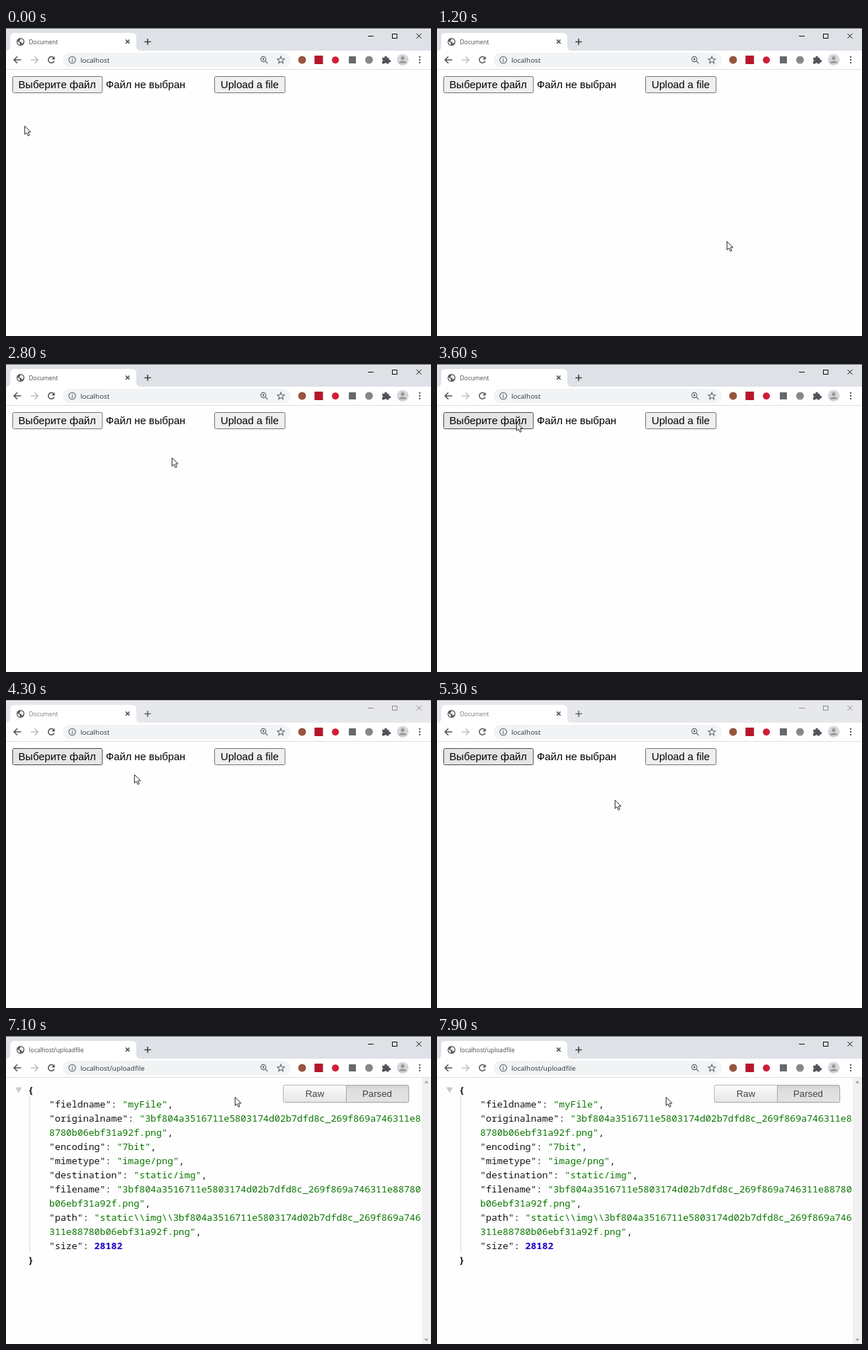
An HTML page that plays this animation: 600 px wide and 435 px high, repeating every 8000 ms.

```html
<!DOCTYPE html>
<html lang="ru">
<head>
<meta charset="utf-8">
<title>Document</title>
<style>
  html, body { margin: 0; width: 100%; height: 100%; overflow: hidden; background: #fefefe; }
  .stage { position: relative; width: 600px; height: 435px; overflow: hidden; animation: focus 8s step-end infinite; }
  svg { position: absolute; left: 0; top: 0; display: block; }

  .ui { font-family: "Open Sans", "Noto Sans", sans-serif; }
  .tab-title { font-size: 8.4px; fill: var(--title); }
  .url { font-size: 9.85px; fill: #303236; }
  .form { font: 14.75px "Liberation Sans", Arial, sans-serif; }
  .bar { fill: var(--bar); }
  .edge { fill: var(--edge); }
  .win { stroke: var(--win); fill: none; }
  .line { fill: none; stroke: #4f5358; stroke-width: 1.5; }
  .thin { fill: none; stroke: #5f6368; stroke-width: 1.1; }
  .btn { fill: #efefef; stroke: #767676; }

  .form, .first { animation: leave 8s step-end infinite; }
  .second, .result { animation: enter 8s step-end infinite; }
  .no-file { animation: unpick 8s step-end infinite; }
  .file { animation: pick 8s step-end infinite; }
  .choose { animation: choose 8s step-end infinite; }
  .send { animation: send 8s step-end infinite; }
  .pointer { animation: move 8s infinite; }

  pre {
    position: absolute; left: 31px; top: 66px; margin: 0;
    font: 13.25px/20px "Noto Sans Mono", "DejaVu Sans Mono", monospace; color: #111;
  }
  pre div { margin-left: 30px; }
  pre i { font-style: normal; color: #0b7500; }
  pre b.num { color: #1a01cc; }

  /* window loses focus while the file dialog is open */
  @keyframes focus {
    0%, 72.5%, 100% { --bar: #dee1e6; --edge: #6a6d72; --title: #45494d; --win: #111; --plus: #3c4043; }
    48.75% { --bar: #e7e8ec; --edge: #b4b6ba; --title: #777a7e; --win: #8c8e91; --plus: #606367; }
  }
  @keyframes leave { 0% { opacity: 1 } 86.25%, 100% { opacity: 0 } }
  @keyframes enter { 0% { opacity: 0 } 86.25%, 100% { opacity: 1 } }
  @keyframes unpick { 0% { opacity: 1 } 72.5%, 100% { opacity: 0 } }
  @keyframes pick { 0% { opacity: 0 } 72.5%, 100% { opacity: 1 } }
  @keyframes choose {
    0%, 81.25%, 100% { fill: #efefef; stroke: #767676 }
    38.75% { fill: #e5e5e5; stroke: #4c4c4c }
  }
  @keyframes send {
    0%, 100% { fill: #efefef; stroke: #767676 }
    83.75% { fill: #e5e5e5; stroke: #4c4c4c }
  }
  @keyframes move {
    0% { transform: translate(26px, 138px); animation-timing-function: steps(1) }
    1.25% { transform: translate(26px, 138px); animation-timing-function: steps(4) }
    6.25% { transform: translate(190px, 215px); animation-timing-function: steps(4) }
    11.25% { transform: translate(396px, 301px); animation-timing-function: steps(1) }
    12.5%, 23.75% { transform: translate(409px, 301px); animation-timing-function: steps(4) }
    28.75% { transform: translate(345px, 260px); animation-timing-function: steps(4) }
    33.75% { transform: translate(250px, 156px); animation-timing-function: steps(1) }
    35% { transform: translate(234px, 132px); animation-timing-function: steps(3) }
    38.75%, 47.5% { transform: translate(112px, 82px); animation-timing-function: steps(4) }
    52.5%, 53.75% { transform: translate(181px, 105px); animation-timing-function: steps(2) }
    56.25% { transform: translate(202px, 123px); animation-timing-function: steps(2) }
    58.75% { transform: translate(246px, 148px); animation-timing-function: steps(3) }
    62.5%, 78.75% { transform: translate(251px, 141px); animation-timing-function: steps(4) }
    83.75%, 100% { transform: translate(323px, 86px); animation-timing-function: steps(1) }
  }
</style>
</head>
<body>
<div class="stage">
  <svg width="600" height="435" viewBox="0 0 600 435">
    <defs>
      <linearGradient id="raised" x2="0" y2="1">
        <stop stop-color="#fbfbfb"/><stop offset="1" stop-color="#e6e6e6"/>
      </linearGradient>
      <linearGradient id="pressed" x2="0" y2="1">
        <stop stop-color="#cfcfcf"/><stop offset=".25" stop-color="#dedede"/><stop offset="1" stop-color="#e3e3e3"/>
      </linearGradient>
    </defs>

    <!-- title bar and tab -->
    <rect class="bar" width="600" height="32"/>
    <rect class="edge" width="600" height="1"/>
    <path fill="#fff" d="M0 32Q6 32 6 26V13Q6 7 12 7H178Q184 7 184 13V26Q184 32 190 32Z"/>
    <rect y="32" width="600" height="26" fill="#fff"/>
    <path d="M0 58.5H600" stroke="#dcdee1"/>
    <circle cx="20.5" cy="19.5" r="5.5" fill="#565a5f"/>
    <path fill="#fff" d="M16.3 18.6L19.5 21V23.9Q16 22.8 16.3 18.6ZM20 15.3Q24.5 15.5 24.8 19.8L22.6 22.4 21.8 19.8 18.9 19.2 19 17.6 20.8 17Z"/>
    <g class="ui tab-title">
      <text class="first" x="32.5" y="22.5">Document</text>
      <text class="second" x="32.5" y="22.5">localhost/uploadfile</text>
    </g>
    <path class="line" d="M169 16.5l5.4 5.4m0-5.4l-5.4 5.4"/>
    <path d="M195.5 19.5h9m-4.5-4.5v9" fill="none" style="stroke:var(--plus)" stroke-width="1.5"/>
    <g class="win">
      <path d="M511 11.5h8"/>
      <rect x="545.5" y="8.5" width="6.5" height="6"/>
      <path d="M579.5 7.8l7 7m0-7l-7 7"/>
    </g>

    <!-- toolbar -->
    <path class="line" d="M21.5 45H11.5M16 40.3L11.3 45 16 49.7"/>
    <path class="line" style="stroke:#bdc0c3" d="M35 45H45M40.5 40.3L45.2 45 40.5 49.7"/>
    <path class="line" d="M67.4 42.2A4.3 4.3 0 1 0 68 46.6"/>
    <path fill="#4f5358" d="M68.8 40V44.4H64.4Z"/>
    <rect x="80" y="35" width="322" height="20" rx="10" fill="#f1f3f4"/>
    <circle class="thin" cx="93.5" cy="45" r="4.8"/>
    <path class="thin" d="M93.5 44.3v3.4M93.5 42v1.2"/>
    <g class="ui url">
      <text class="first" x="105" y="48.6">localhost</text>
      <text class="second" x="105" y="48.6">localhost/uploadfile</text>
    </g>
    <circle class="thin" cx="363.3" cy="44" r="3.6"/>
    <path class="thin" d="M366 46.7l3.4 3.4M361.6 44h3.4m-1.7-1.7v3.4"/>
    <path class="thin" d="M388 40.2l1.4 3.3 3.6.3-2.7 2.4.8 3.5-3.1-1.9-3.1 1.9.8-3.5-2.7-2.4 3.6-.3Z"/>

    <circle cx="418" cy="45" r="5.5" fill="#96553f"/>
    <rect x="435.5" y="39" width="12" height="12" fill="#b5162c"/>
    <circle cx="465" cy="45.3" r="5" fill="#cf1f35"/>
    <rect x="484" y="40" width="10" height="10" fill="#66696c"/>
    <circle cx="512.5" cy="45" r="5.5" fill="#85888b"/>

    <path fill="#505459" d="M531 42h3.4a1.8 1.8 0 1 1 3.4 0h2.7v3a1.9 1.9 0 1 1 0 3.4v2.1h-3a1.8 1.8 0 0 0-3.4 0H531v-3a1.8 1.8 0 0 0 0-3.4Z"/>
    <circle cx="560" cy="45" r="8.3" fill="#d5d6d9"/>
    <circle cx="560" cy="42.6" r="2.6" fill="#97999d"/>
    <path fill="#97999d" d="M554.8 49.8Q555 46.6 560 46.6T565.2 49.8Z"/>
    <g fill="#4f5358">
      <circle cx="584" cy="41" r="1.15"/><circle cx="584" cy="45" r="1.15"/><circle cx="584" cy="49" r="1.15"/>
    </g>

    <!-- upload form -->
    <g class="form">
      <rect class="btn choose" x="9.5" y="68.5" width="126.5" height="23" rx="2"/>
      <rect class="btn send" x="294.5" y="68.5" width="99.5" height="23" rx="2"/>
      <text x="17.5" y="85">Выберите файл</text>
      <text class="no-file" x="141" y="85">Файл не выбран</text>
      <text class="file" x="141" y="85">3bf804a3…1a92f.png</text>
      <text x="303" y="85">Upload a file</text>
    </g>

    <!-- result page -->
    <g class="result">
      <path d="M13 72.5h9.5l-4.75 8Z" fill="#c9c9c9"/>
      <path d="M33.5 86V306" stroke="#bbb" stroke-dasharray="1 1"/>
      <rect x="391.5" y="70.5" width="177.5" height="24" rx="2" fill="none" stroke="#000" stroke-opacity=".1"/>
      <path d="M393.5 69.5H480.5V93.5H393.5a2 2 0 0 1-2-2V71.5a2 2 0 0 1 2-2Z" fill="url(#raised)" stroke="#b6b6b6"/>
      <path d="M480.5 69.5H566.5a2 2 0 0 1 2 2V91.5a2 2 0 0 1-2 2H480.5Z" fill="url(#pressed)" stroke="#a9a9a9"/>
      <g font-family="Liberation Sans, Arial, sans-serif" font-size="13.25" fill="#444" text-anchor="middle">
        <text x="436" y="86">Raw</text>
        <text x="524" y="86">Parsed</text>
      </g>
      <rect x="587" y="59" width="13" height="376" fill="#f1f1f1"/>
      <path d="M590.5 66.5h6l-3-3.4ZM590.5 427.5h6l-3 3.4Z" fill="#a3a3a3"/>
    </g>
  </svg>

  <pre class="result"><b>{</b><div>"fieldname": <i>"myFile"</i>,
"originalname": <i>"3bf804a3516711e5803174d02b7dfd8c_269f869a746311e8
8780b06ebf31a92f.png"</i>,
"encoding": <i>"7bit"</i>,
"mimetype": <i>"image/png"</i>,
"destination": <i>"static/img"</i>,
"filename": <i>"3bf804a3516711e5803174d02b7dfd8c_269f869a746311e88780
b06ebf31a92f.png"</i>,
"path": <i>"static\\img\\3bf804a3516711e5803174d02b7dfd8c_269f869a746
311e88780b06ebf31a92f.png"</i>,
"size": <b class="num">28182</b></div><b>}</b></pre>

  <svg width="600" height="435" viewBox="0 0 600 435">
    <path class="pointer" fill="#fff" stroke="#222" stroke-width=".95" stroke-linejoin="round"
      d="M.4.5V12.3L3.1 9.8 5.1 14.3 7.1 13.4 5.2 9H8.9Z"/>
  </svg>
</div>
</body>
</html>
```
